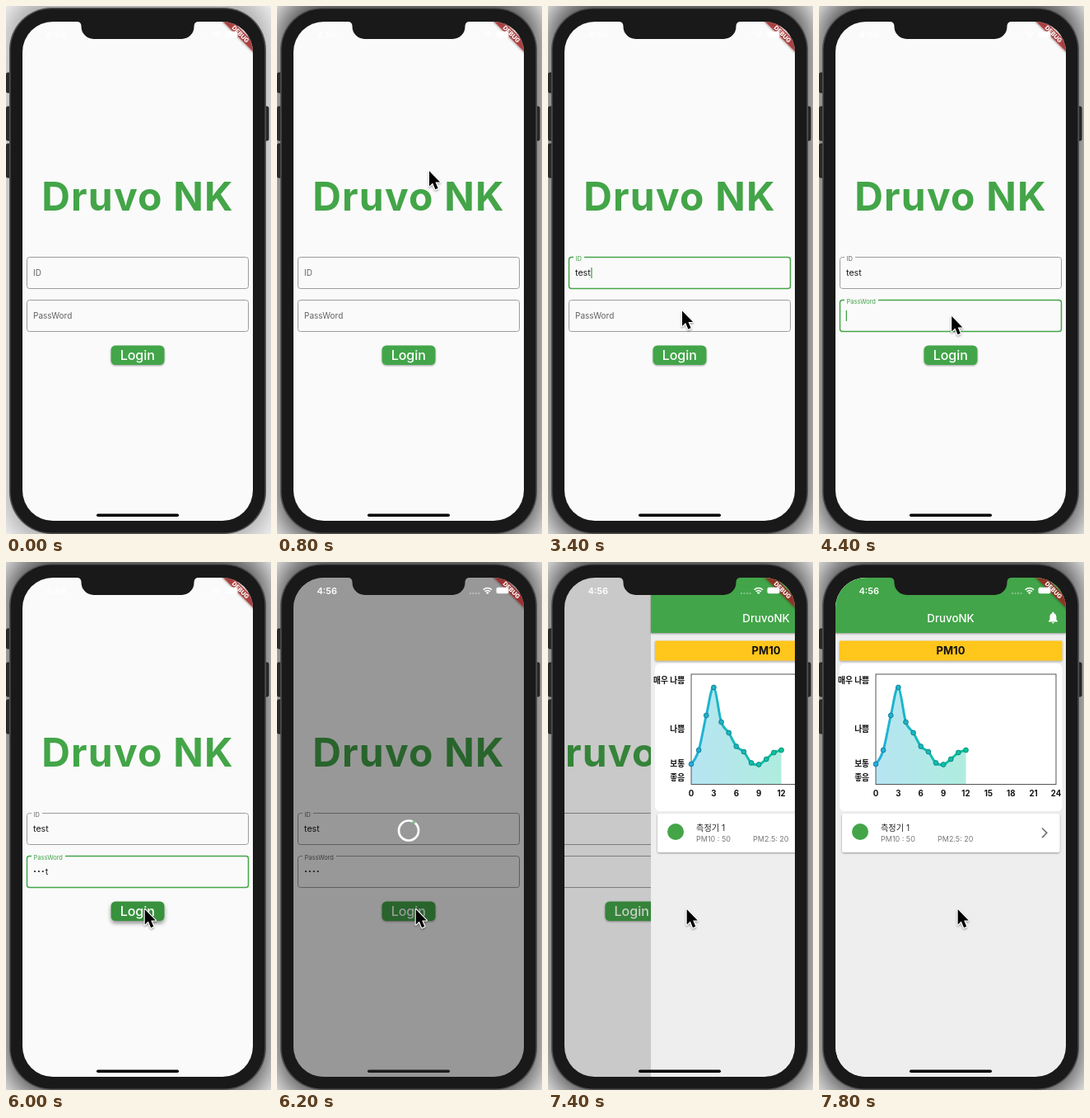
An HTML page that plays this animation: 322 by 640 pixels, repeating every 8000 ms.

```html
<!DOCTYPE html>
<html lang="ko">
<head>
<meta charset="utf-8">
<title>Login demo</title>
<style>
  html, body { margin: 0; width: 100%; height: 100%; overflow: hidden; background: #fff; }
  svg { display: block; width: 100vw; height: 100vh; }
  text { font-family: Inter, "Noto Sans CJK KR", "Noto Sans CJK", sans-serif; white-space: pre; }
  .mid { text-anchor: middle; }
  .axis { font-size: 9.7px; font-weight: 700; fill: #111; }
  .end { text-anchor: end; }
</style>
</head>
<body>
<svg viewBox="0 0 322 640" preserveAspectRatio="none">
  <defs>
    <clipPath id="screen"><rect x="20" y="19" width="280" height="605" rx="37"/></clipPath>
    <filter id="glow" x="-40%" y="-30%" width="180%" height="160%"><feGaussianBlur stdDeviation="22"/></filter>
    <filter id="soft" x="-20%" y="-30%" width="140%" height="180%">
      <feDropShadow dx="0" dy="1" stdDeviation="0.9" flood-opacity=".38"/>
    </filter>
    <filter id="lift" x="-20%" y="-40%" width="140%" height="220%">
      <feDropShadow dx="0" dy="3" stdDeviation="2.4" flood-opacity=".42"/>
    </filter>
    <filter id="arrowShade" x="-40%" y="-30%" width="190%" height="180%">
      <feDropShadow dx="0" dy="1.5" stdDeviation="1.3" flood-opacity=".4"/>
    </filter>
    <linearGradient id="wave" gradientUnits="userSpaceOnUse" x1="69" x2="178.5" y1="0" y2="0">
      <stop offset="0" stop-color="#23b0da"/><stop offset="1" stop-color="#0bc69c"/>
    </linearGradient>
  </defs>

  <rect width="322" height="640" fill="#fff"/>
  <rect id="shade" x="2" y="-12" width="316" height="662" rx="44" filter="url(#glow)"/>

  <g fill="#2b2b2b" stroke="#111" stroke-width=".8">
    <rect x=".5" y="81" width="6" height="24" rx="1.5"/>
    <rect x=".5" y="122" width="6" height="41" rx="1.5"/>
    <rect x=".5" y="167" width="6" height="41" rx="1.5"/>
    <rect x="313" y="122" width="6" height="41" rx="1.5"/>
  </g>
  <rect x="4" y="2" width="312" height="638" rx="51" fill="#505050"/>
  <rect x="5.6" y="3.6" width="308.8" height="634.8" rx="49.5" fill="#191919"/>

  <g clip-path="url(#screen)">
    <g id="loginPage">
      <rect x="20" y="19" width="280" height="605" fill="#fafafa"/>
      <text class="mid" x="160" y="248" font-size="48" font-weight="700" letter-spacing="1.2" fill="#43a548">Druvo NK</text>
      <g id="fields"></g>
      <rect id="button" x="127.5" y="411.5" width="65" height="23.5" rx="5.5"/>
      <text class="mid" x="159.8" y="429" font-size="16" font-weight="500" fill="#fff">Login</text>
    </g>
    <g id="dialog">
      <rect id="barrier" x="20" y="19" width="280" height="605" opacity=".59"/>
      <g fill="none" stroke-width="2.7">
        <circle cx="160" cy="325.5" r="12" stroke="#fff"/>
        <path id="arc" stroke="#43a548"/>
      </g>
    </g>
    <g id="homePage">
      <rect x="20" y="19" width="280" height="605" fill="#eee"/>
      <rect x="20" y="15" width="280" height="71" fill="#43a548" filter="url(#soft)"/>
      <text class="mid" x="160" y="73" font-size="13.3" font-weight="500" fill="#fff">DruvoNK</text>
      <path d="M279 72.5v-1l1.4-1.5v-3.6c0-2.2 1.1-3.7 2.9-4.2v-.5a1.1 1.1 0 0 1 2.2 0v.5c1.8.5 2.9 2 2.9 4.2V70l1.4 1.5v1zM283 73.2h2.8a1.4 1.4 0 0 1-2.8 0z" fill="#fff"/>
      <rect x="25" y="95.5" width="270.5" height="24" rx="1" fill="#ffc61f" filter="url(#soft)"/>
      <text class="mid" x="160" y="112" font-size="13" font-weight="700" fill="#111">PM10</text>
      <rect x="25" y="123" width="270.5" height="179" rx="6" fill="#fff"/>
      <g id="chart"></g>
      <rect x="28" y="305" width="264.5" height="47" rx="2.5" fill="#fff" filter="url(#soft)"/>
      <circle cx="50" cy="327" r="10" fill="#43a548"/>
      <text x="75" y="325.5" font-size="10.2" fill="#222">측정기 1</text>
      <text x="75" y="339" font-size="9" fill="#777">PM10 : 50</text>
      <text x="144" y="339" font-size="9" fill="#777">PM2.5: 20</text>
      <path d="M271 322.5l5.8 5.8-5.8 5.8" fill="none" stroke="#757575" stroke-width="1.7"/>
    </g>
    <g transform="translate(285 34) rotate(45)">
      <rect x="-34" y="-4.4" width="68" height="8.8" fill="#a02525" fill-opacity=".78" filter="url(#soft)"/>
      <text class="mid" y="2.7" font-size="7.4" font-weight="800" fill="#fff">DEBUG</text>
    </g>
    <g fill="#fff">
      <text x="48.5" y="39" font-size="11" font-weight="600">4:56</text>
      <path d="M234 38h2m1.5 0h2m1.5 0h2m1.5 0h2" stroke="#fff" stroke-width="1.5" opacity=".45"/>
      <path d="M250.6 33.7a7.4 7.4 0 0 1 10.4 0M252.6 35.9a4.6 4.6 0 0 1 6.4 0" fill="none" stroke="#fff" stroke-width="1.5"/>
      <path d="M253.9 37.2a2.8 2.8 0 0 1 3.8 0l-1.9 1.9z"/>
      <rect x="266.5" y="30.7" width="15" height="7.6" rx="2"/>
    </g>
    <rect id="homeBar" x="110" y="615.5" width="100" height="3.4" rx="1.7"/>
  </g>
  <path d="M86 18V19Q91 19 91.500 24V25A15 15 0 0 0 106.500 40H213.500A15 15 0 0 0 228.500 25V24Q229 19 234 19V18Z" fill="#191919"/>
  <path id="cursor" d="M0 0V20.500L4.600 16.200 8.200 24.600 11.800 23 8.300 14.900H14.600Z" stroke="#fff" stroke-width="2.400" stroke-linejoin="round" paint-order="stroke" filter="url(#arrowShade)"/>
</svg>
<script>
const LOOP = 8000, STEP = 200;
const GREEN = '#43a548';
const DIALOG_AT = 6100, HOME_AT = 7300;
const $ = id => document.getElementById(id);
const clamp = v => Math.max(0, Math.min(1, v));
const set = (id, attrs) => {
  for (const k in attrs) $(id).setAttribute(k, attrs[k]);
};

function bezier(x1, y1, x2, y2) {
  const at = (a, b, s) => 3 * a * s * (1 - s) ** 2 + 3 * b * s * s * (1 - s) + s ** 3;
  return x => {
    if (x <= 0 || x >= 1) return clamp(x);
    let lo = 0, hi = 1;
    for (let i = 0; i < 24; i++) {
      const m = (lo + hi) / 2;
      if (at(x1, x2, m) < x) lo = m; else hi = m;
    }
    return at(y1, y2, lo);
  };
}
const fastOut = bezier(.4, 0, .2, 1);
const slideIn = bezier(.35, .91, .33, .97);

// time, x, y of the pointer tip
const pointer = [
  [400, 215, -30], [800, 185, 200], [1200, 168, 307], [1600, 168, 321.3],
  [3000, 168, 321.3], [3400, 163, 369.5], [3800, 161.2, 376], [5200, 161.2, 376],
  [5800, 168.7, 421]
];
function pointerAt(t) {
  const next = pointer.findIndex(p => p[0] > t);
  if (next < 0) return pointer[pointer.length - 1].slice(1);
  if (next === 0) return pointer[0].slice(1);
  const [t0, x0, y0] = pointer[next - 1], [t1, x1, y1] = pointer[next];
  const k = (t - t0) / (t1 - t0);
  return [x0 + (x1 - x0) * k, y0 + (y1 - y0) * k];
}

function field(label, y, { focus, raised, dots = 0, text = '', caret, gap }) {
  const w = focus ? 1.5 : 1;
  let s = `<rect x="25.5" y="${y}" width="269" height="38" rx="3" fill="none" stroke="${focus ? GREEN : '#9c9c9c'}" stroke-width="${w}"/>`;
  if (raised) {
    s += `<rect x="31" y="${y - 2}" width="${gap}" height="4" fill="#fafafa"/>
      <text x="33.5" y="${y + 4}" font-size="7.5" fill="${focus ? GREEN : '#666'}">${label}</text>`;
  } else {
    s += `<text x="33" y="${y + 22.5}" font-size="10" fill="#626262">${label}</text>`;
  }
  for (let i = 0; i < dots; i++) s += `<circle cx="${35 + i * 4.9}" cy="${y + 18.5}" r="1.1" fill="#222"/>`;
  const x = 33 + dots * 4.9;
  s += `<text x="${x}" y="${y + 22.2}" font-size="10.7" fill="#1c1c1c">${text}</text>`;
  if (caret) {
    const cx = x + text.length * 4.9;
    s += `<rect x="${cx - .3}" y="${y + 12.5}" width="1.3" height="13" fill="${GREEN}"/>`;
  }
  return s;
}

const typed = (t, start) => Math.max(0, Math.min(4, Math.floor((t - start) / STEP) + 1));

function drawFields(t) {
  const idFocus = t >= 2000 && t < 4000;
  const passFocus = t >= 4000 && t < DIALOG_AT;
  const n = typed(t, 4600);
  const hidden = t >= DIALOG_AT ? n : Math.max(0, n - 1);
  const blink = t < 5400 || t % 1000 >= 500;
  $('fields').innerHTML =
    field('ID', 304.5, {
      focus: idFocus, raised: t >= 2000, gap: 13,
      text: 'test'.slice(0, typed(t, 2600)), caret: idFocus && t >= 2200
    }) +
    field('PassWord', 356.5, {
      focus: passFocus, raised: t >= 4000, gap: 41, dots: hidden,
      text: 'test'.slice(hidden, n), caret: passFocus && blink
    });
}

function spinner(age) {
  const p = age / 1333 % 1;
  const head = fastOut(clamp(2 * p)), tail = fastOut(clamp(2 * p - 1));
  const from = (-90 + tail * 270 + age / 2222 * 360 + p * 90) * Math.PI / 180;
  const sweep = Math.max((head - tail) * 1.5 * Math.PI, .01);
  const at = a => `${160 + 12 * Math.cos(a)} ${325.5 + 12 * Math.sin(a)}`;
  return `M${at(from)}A12 12 0 ${sweep > Math.PI ? 1 : 0} 1 ${at(from + sweep)}`;
}

function buildChart() {
  const left = 69, bottom = 269.5, hour = 219 / 24;
  const levels = [245, 228, 186, 152, 194, 207, 223.5, 230, 243.5, 245.5, 239, 231, 228];
  const pts = levels.map((y, i) => [left + i * hour, y]);
  let line = `M${pts[0]}`, bend = [0, 0];
  for (let i = 1; i < pts.length; i++) {
    const a = pts[i - 1], b = pts[i], c = pts[i + 1] || b;
    const turn = [0, 1].map(k => (c[k] - a[k]) / 2 * .35);
    line += `C${a[0] + bend[0]} ${a[1] + bend[1]} ${b[0] - turn[0]} ${b[1] - turn[1]} ${b}`;
    bend = turn;
  }
  let s = `<path d="${line}V${bottom}H${left}Z" fill="url(#wave)" opacity=".33"/>
    <path d="${line}" fill="none" stroke="url(#wave)" stroke-width="3" stroke-linecap="round"/>
    <rect x="${left}" y="136" width="219" height="133.5" fill="none" stroke="#555"/>`;
  pts.forEach(([x, y], i) => {
    const k = i / 12;
    const tone = f => `rgb(${[35 - 24 * k, 172 + 24 * k, 218 - 62 * k].map(v => Math.round(v * f))})`;
    s += `<circle cx="${x}" cy="${y}" r="2.9" fill="${tone(1)}" stroke="${tone(.7)}" stroke-width=".9"/>`;
  });
  for (let h = 0; h <= 24; h += 3) s += `<text class="axis mid" x="${left + h * hour}" y="284">${h}</text>`;
  [['매우 나쁨', 147], ['나쁨', 206], ['보통', 248], ['좋음', 265]].forEach(([name, y]) => {
    s += `<text class="axis end" x="61" y="${y}">${name}</text>`;
  });
  $('chart').innerHTML = s;
}

function render(t) {
  set('shade', { opacity: .42 + .42 * clamp(t / 400) });
  drawFields(t);

  const pressed = t >= 5800 && t < DIALOG_AT;
  set('button', { fill: pressed ? '#37913c' : GREEN, filter: `url(#${pressed ? 'lift' : 'soft'})` });

  const dim = clamp((t - DIALOG_AT) / 150) * (1 - clamp((t - HOME_AT) / 150));
  set('dialog', { opacity: dim });
  set('arc', { d: spinner(Math.max(0, t - DIALOG_AT)) });

  const slide = slideIn(clamp((t - HOME_AT) / 400));
  set('loginPage', { transform: `translate(${-93 * slide} 0)` });
  set('homePage', { transform: `translate(${280 * (1 - slide)} 0)`, display: slide > 0 ? 'inline' : 'none' });
  set('homeBar', { fill: dim > .5 ? '#1c1c1c' : '#000' });

  const [x, y] = pointerAt(t);
  set('cursor', { transform: `translate(${x} ${y}) scale(.9)` });
}

buildChart();
const begin = performance.now();
function tick() {
  const t = (performance.now() - begin) % LOOP;
  render(Math.floor(t / STEP) * STEP);
  requestAnimationFrame(tick);
}
tick();
</script>
</body>
</html>
```
